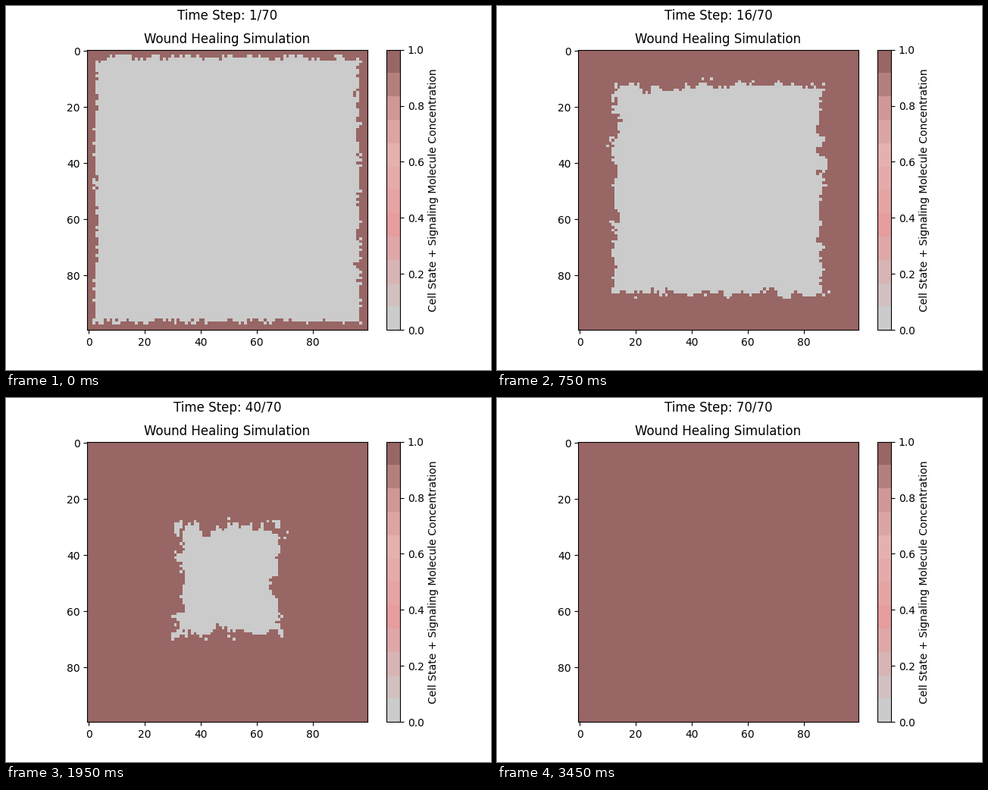
A matplotlib script for the animation above (3500 ms loop, 640 by 480 pixels).

```python
import numpy as np
import matplotlib.pyplot as plt
from matplotlib.animation import FuncAnimation
from matplotlib.colors import LinearSegmentedColormap

SIZE, STEPS = 100, 70
rng = np.random.default_rng(12)

TISSUE = LinearSegmentedColormap.from_list(
    "tissue", [(0, "#cbcbcb"), (.36, "#e59d9d"), (.64, "#e5b1af"),
               (.82, "#ce9896"), (1, "#986664")], N=12)


def smooth_noise(passes):
    field = rng.standard_normal((SIZE, SIZE))
    for _ in range(passes):
        for axis in (0, 1):
            field = (field + np.roll(field, 1, axis) + np.roll(field, -1, axis)) / 3
    return field / field.std()


def healing_order():
    """Effective depth of each cell; shallow cells heal first."""
    row, col = np.mgrid[:SIZE, :SIZE]
    top = row + 1.7 * np.clip((row - 15) / 8, 0, 1)
    vertical = np.minimum(top, SIZE - 1 - row)
    side = np.minimum(col, SIZE - 1 - col)
    base = np.minimum(vertical, side) + .5
    growth = np.clip(base / 8, .3, 1)

    depth = base + rng.uniform(-.85, .85, base.shape)
    depth += .9 * growth * smooth_noise(2)
    depth += 3 * (base / 50) ** 3 * smooth_noise(12)
    # Corners lag behind the edges midway
    corner = np.clip(1 - np.abs(vertical - side) / 9, 0, 1)
    depth += 4 * corner * np.exp(-((base - 24) / 8) ** 2)
    # A few cells are left behind
    depth += 2.5 * growth * (rng.random(base.shape) < .025)
    return np.minimum(depth, SIZE / 2)


order = healing_order()


def cells(step):
    front = np.interp(step, [1, 16, 31, 66], [3.1, 13.5, 26, 52])
    return (order < front).astype(float)


fig, ax = plt.subplots(figsize=(6.4, 4.8), dpi=100)
image = ax.imshow(cells(1), cmap=TISSUE, vmin=0, vmax=1)
ax.set_title("Wound Healing Simulation")
fig.colorbar(image, ax=ax, label="Cell State + Signaling Molecule Concentration")
counter = ax.text(.5, 1.097, "", transform=ax.transAxes, fontsize=12,
                  ha="center", va="bottom")


def update(frame):
    image.set_data(cells(frame + 1))
    counter.set_text(f"Time Step: {frame + 1}/{STEPS}")
    return image, counter


anim = FuncAnimation(fig, update, frames=STEPS, interval=50, repeat=True,
                     repeat_delay=0)
plt.show()
```
